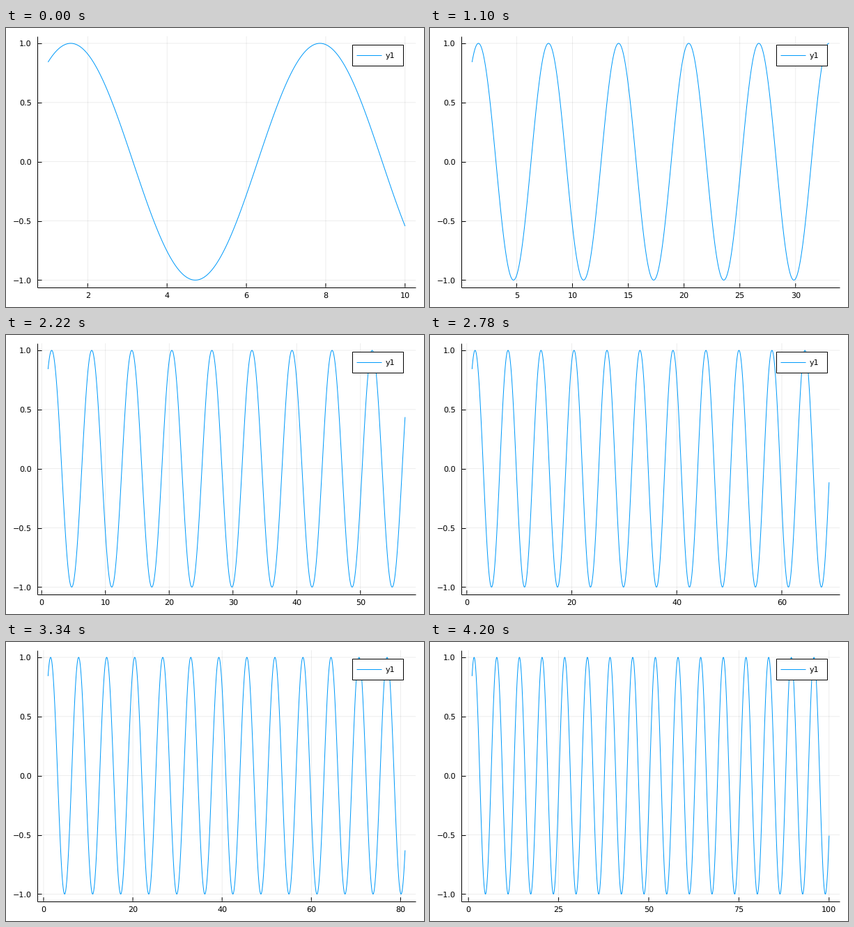
Write a matplotlib script that moves like this. It is 600x400 px and loops after 4.22 s.

```python
import math

import numpy as np
import matplotlib.pyplot as plt
from matplotlib.animation import FuncAnimation
from matplotlib.patches import Rectangle

plt.rcParams.update({
    "font.family": "DejaVu Sans",
    "font.size": 8,
    "text.hinting": "none",
    "path.simplify": False,
})

W, H, DPI = 600, 400, 100
PX = 72 / DPI                       # one pixel in points
LEFT, RIGHT, TOP, BOTTOM = 45.0, 588.19, 11.81, 371.6
PAD = 0.03                          # axis padding on each side of the data
TICK = 5.5
BLUE = "#009AFA"
FIRST, LAST = 10, 100
SLOT = 20                           # ms

# Tick step mantissas with their niceness, widest first so ties keep the wider
STEPS = [(5, 0.9), (3, 0.2), (2.5, 0.5), (2, 0.7), (1, 1.0)]


def nice_ticks(lo, hi):
    """Pick 4 to 8 ticks, weighing count, coverage and niceness."""
    span, best, ticks = hi - lo, -math.inf, []
    for power in (1, 0):
        for q, nice in STEPS:
            step = q * 10 ** power
            vals = np.arange(math.ceil(lo / step), math.floor(hi / step) + 1) * step
            if not 4 <= len(vals) <= 8:
                continue
            count = 1 - abs(len(vals) - 5) / 5
            cover = 1.5 * span / (vals[-1] - vals[0])
            score = count / 4 + cover / 3 + nice / 4
            if score > best + 1e-9:
                best, ticks = score, vals
    return ticks


def to_y(v):
    mid, half = (TOP + BOTTOM) / 2, (BOTTOM - TOP) / 2
    return mid - v * half / (1 + 2 * PAD)


def segments(points, a, b):
    """Coordinates for parallel strokes a..b, separated by gaps."""
    along = np.repeat(points, 3)
    across = np.tile([a, b, np.nan], len(points))
    return along, across


# Every third end value is held five times as long as the others
schedule = []
for i, n in enumerate(range(FIRST, LAST + 1)):
    schedule += [n] * (5 if i % 3 == 1 else 1)

fig = plt.figure(figsize=(W / DPI, H / DPI), dpi=DPI, facecolor="white")
ax = fig.add_axes([0, 0, 1, 1])
ax.set(xlim=(0, W), ylim=(H, 0))
ax.axis("off")


def stroke(x, y, color="black", width=1.0, **kw):
    return ax.plot(x, y, color=color, lw=width * PX,
                   solid_capstyle="butt", **kw)[0]


GRID = dict(width=0.7, alpha=0.1, snap=False, zorder=1)

# Fixed vertical axis
levels = np.array([-1, -0.5, 0, 0.5, 1])
rows, cols = segments(to_y(levels), LEFT, RIGHT)
stroke(cols, rows, **GRID)
rows, cols = segments(to_y(levels), LEFT, LEFT + TICK)
stroke(cols, rows, zorder=2)
for v in levels:
    ax.text(36.8, to_y(v) + 4.1, f"{v:.1f}".replace("-", "\u2212"),
            ha="right", va="baseline")
stroke([LEFT, LEFT], [TOP, BOTTOM], zorder=2)
stroke([LEFT, RIGHT], [BOTTOM, BOTTOM], zorder=2)

# Moving parts
grid = stroke([], [], **GRID)
marks = stroke([], [], snap=False, zorder=2)
labels = [ax.text(0, 387, "", ha="center", va="baseline") for _ in range(8)]
curve = stroke([], [], BLUE, zorder=3)

# Legend
ax.add_patch(Rectangle((497, 24), 73, 30, fc="white", ec="black",
                       lw=PX, zorder=4))
stroke([503, 539], [39, 39], BLUE, zorder=5)
ax.text(544.7, 43.2, "y1", va="baseline", zorder=5)


def update(slot):
    n = schedule[slot]
    pad = PAD * (n - 1)
    lo, hi = 1 - pad, n + pad

    def to_x(v):
        return LEFT + (v - lo) / (hi - lo) * (RIGHT - LEFT)

    x = np.linspace(1, n, 2000)
    curve.set_data(to_x(x), to_y(np.sin(x)))

    ticks = nice_ticks(lo, hi)
    grid.set_data(*segments(to_x(ticks), TOP, BOTTOM))
    marks.set_data(*segments(to_x(ticks), BOTTOM - TICK, BOTTOM))
    digits = 0 if all(t == int(t) for t in ticks) else 1
    for i, label in enumerate(labels):
        shown = i < len(ticks)
        label.set_visible(shown)
        if shown:
            label.set_x(to_x(ticks[i]))
            label.set_text(f"{ticks[i]:.{digits}f}")
    return [grid, marks, curve, *labels]


anim = FuncAnimation(fig, update, frames=len(schedule), interval=SLOT,
                     init_func=lambda: update(0), repeat=True,
                     repeat_delay=0, blit=False)
plt.show()
```
